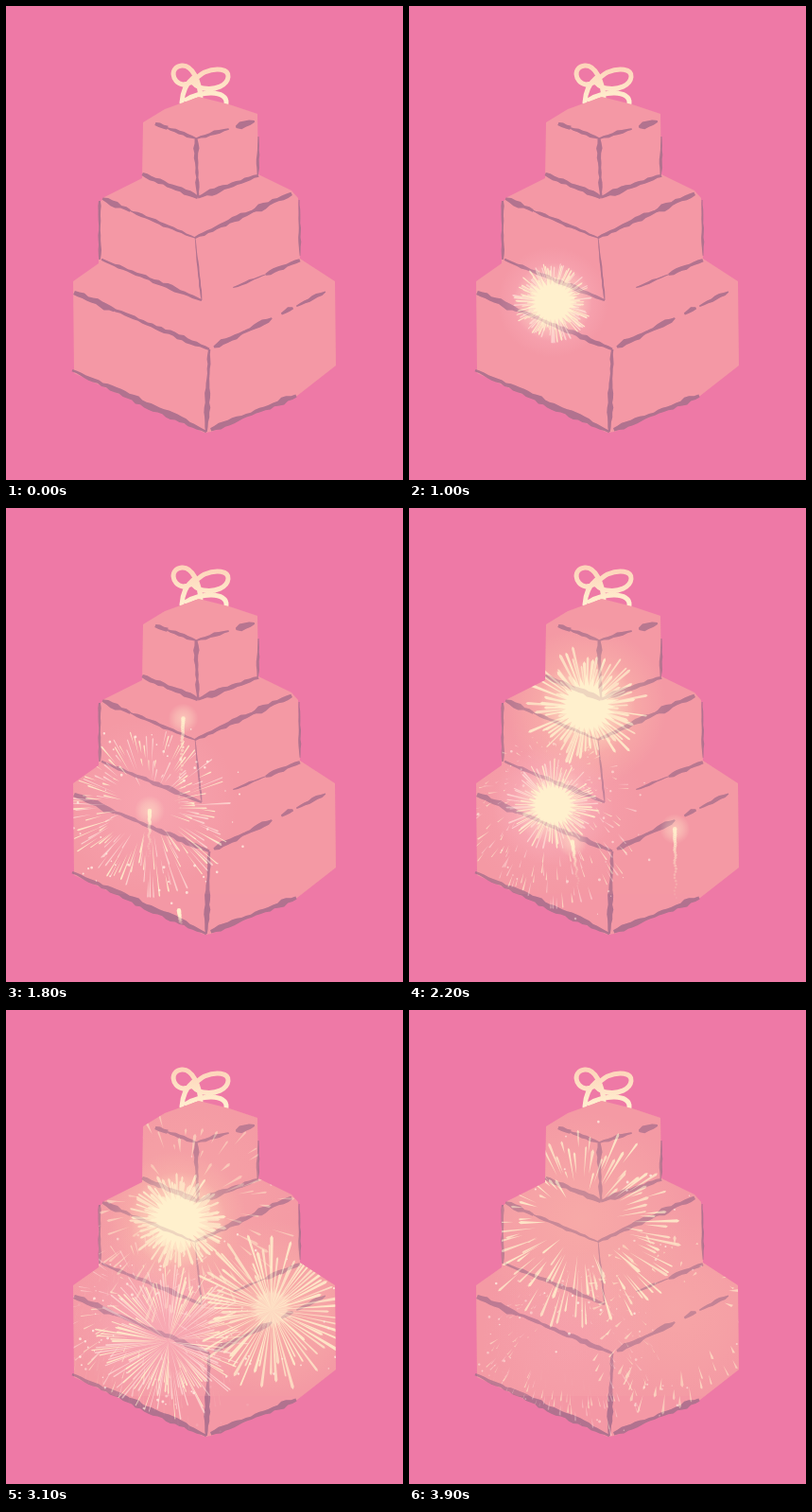
Recreate the animation shown at these times as an HTML page with a canvas. Size 420x501 px, loop 4 s.

```html
<!DOCTYPE html>
<html lang="en">
<head>
<meta charset="utf-8">
<title>Firework cake</title>
<style>
html, body { margin: 0; width: 100%; height: 100%; overflow: hidden; background: #ee79a6; }
canvas { display: block; }
</style>
</head>
<body>
<canvas id="stage" width="420" height="501"></canvas>
<script>
const ctx = document.getElementById('stage').getContext('2d');
const LOOP = 4000, STEP = 100, TAU = Math.PI * 2;
const PINK = '#ee79a6', CREAM = '#fff0cd', BLUSH = '#ffdfd9', MAUVE = '#b1728f';

function seeded(s) {
  return () => {
    s = (s * 16807) % 2147483647;
    return s / 2147483647;
  };
}
const clamp = v => Math.max(0, Math.min(1, v));
const rnd = seeded(4721);

const cake = new Path2D(
  'M145 123L168 109L204 96L236 104L266 114L267 178L302 195L309 203L311 267L348 291L349 380' +
  'L308 412L217 450L210 451L128 414L72 388L71 291L98 272L98 209L104 202L144 182Z');

const ribbon = new Path2D(
  'M206 98C205 79 197 62 186 63C173 64 175 81 187 83C197 83 202 74 210 70' +
  'C222 65 236 66 235 75C234 84 222 89 209 87Q200 86 196 78' +
  'M186 102Q187 85 198 76M191 99C204 90 235 88 233 103');

// Ragged brush mark from one point to another
const ink = new Path2D();
function brush([x0, y0], [x1, y1], w, from = 0, to = 1) {
  const dx = x1 - x0, dy = y1 - y0, len = Math.hypot(dx, dy);
  const n = Math.max(3, Math.round(len * (to - from) / 5));
  const near = [], far = [], phase = rnd() * TAU;
  for (let i = 0; i <= n; i++) {
    const v = i / n, u = from + (to - from) * v;
    const half = w * Math.min(1, 0.5 + 3 * Math.min(v, 1 - v)) * (0.5 + 0.12 * Math.sin(phase + v * 7));
    const a = half * (0.6 + rnd() * 0.8), b = half * (0.6 + rnd() * 0.8);
    const x = x0 + dx * u, y = y0 + dy * u;
    near.push([x - dy / len * a, y + dx / len * a]);
    far.unshift([x + dy / len * b, y - dx / len * b]);
  }
  near.concat(far).forEach(([x, y], i) => i ? ink.lineTo(x, y) : ink.moveTo(x, y));
  ink.closePath();
}

// Each tier: left, front and right corners of its top and of its base
const [top1, top2, top3] = [
  { t: [[158, 124], [201, 140], [263, 122]], b: [[144, 178], [203, 202], [267, 179]] },
  { t: [[102, 204], [200, 245], [302, 198]], b: [[101, 268], [207, 311], [311, 269]] },
  { t: [[72, 303], [215, 363], [338, 302]], b: [[70, 385], [212, 450], [307, 412]] }
];
function edges({ t, b }, wt, wb, wv) {
  brush(t[0], t[1], wt, 0, 0.3);
  brush(t[0], t[1], wt * 0.65, 0.28);
  brush(b[0], b[1], wb);
  brush(t[1], b[1], wv);
}
edges(top1, 5.5, 5.5, 4);
edges(top2, 5, 4, 1.8);
edges(top3, 6.5, 5.5, 4.5);
brush(top1.t[1], top1.t[2], 3.5, 0, 0.56);
brush(top1.t[1], top1.t[2], 6, 0.68);
brush(top1.b[1], top1.b[2], 4.8);
brush([267, 138], [266, 181], 2.5);
brush(top2.t[1], top2.t[2], 4.5, 0, 0.62);
brush(top2.t[1], top2.t[2], 6, 0.58);
brush(top2.b[1], top2.b[2], 2, 0.32, 0.66);
brush(top2.b[1], top2.b[2], 4.5, 0.65);
brush([99, 206], [99, 268], 3);
brush([310, 205], [311, 264], 2);
brush(top3.t[1], top3.t[2], 6, 0.04, 0.3);
brush(top3.t[1], top3.t[2], 4, 0.28, 0.54);
brush(top3.t[1], top3.t[2], 4.5, 0.62, 0.72);
brush(top3.t[1], top3.t[2], 3.5, 0.75);
brush(top3.b[1], top3.b[2], 5.5, 0.05);

// at: moment of bursting, R: reach, from: where its rocket starts
const soft = { R: 92, n: 150, core: 22, w: 1.7, dots: 70, tint: BLUSH, life: 2500 };
const bold = { R: 114, n: 76, core: 27, w: 3, dots: 25, tint: CREAM, life: 2500 };
const bursts = [
  { ...soft, at: 800, x: 152, y: 313, from: [155, 425] },
  { ...soft, at: 1950, x: 152, y: 314, n: 90, dots: 20, life: 2000, from: [151, 410] },
  { ...bold, at: 1950, x: 188, y: 210, R: 122, life: 1800, from: [180, 410] },
  { ...soft, at: 2350, x: 172, y: 347, core: 0, from: [185, 440] },
  { ...bold, at: 2500, x: 281, y: 315, R: 100, from: [282, 412] },
  { ...bold, at: 2900, x: 182, y: 222, n: 105, dots: 40, from: [184, 410] }
];
const RISE = 600;
const many = (n, make) => Array.from({ length: n }, (_, i) => make(i));
for (const b of bursts) {
  b.rays = many(b.n, i => ({
    a: (i + rnd() * 0.9) / b.n * TAU,
    s: 0.42 + 0.6 * Math.pow(rnd(), 0.65),
    lag: 450 + rnd() * 350,
    w: b.w * (0.55 + rnd() * 0.6),
    pale: rnd() < 0.5
  }));
  b.sparks = many(b.dots, () => ({ a: rnd() * TAU, s: 0.6 + rnd() * 0.6, w: 0.6 + rnd() * 0.9, blink: rnd() * 9 }));
}

const spread = age => age <= 0 ? 0 : 1 - Math.exp(-age / 335);

function glow(x, y, r, rgb, alpha) {
  const g = ctx.createRadialGradient(x, y, 0, x, y, r);
  g.addColorStop(0, `rgba(${rgb},${alpha})`);
  g.addColorStop(0.55, `rgba(${rgb},${alpha * 0.55})`);
  g.addColorStop(1, `rgba(${rgb},0)`);
  ctx.fillStyle = g;
  ctx.fillRect(x - r, y - r, r * 2, Math.max(0, Math.min(r * 2, 408 - y + r)));
}

function disc(x, y, r) {
  ctx.moveTo(x + r, y);
  ctx.arc(x, y, r, 0, TAU);
}

function rocket(b, t) {
  const u = (t - b.at + RISE) / RISE;
  if (u <= 0 || u >= 1) return;
  const pos = v => {
    const e = 1 - (1 - v) * (1 - v);
    return [b.from[0] + (b.x - b.from[0]) * e, b.from[1] + (b.y - b.from[1]) * e];
  };
  const [hx, hy] = pos(u);
  glow(hx, hy, 16, '255,226,200', 0.6);
  ctx.fillStyle = CREAM;
  const tail = Math.max(0, u - 0.5);
  for (let i = 0; i <= 26; i++) {
    const [x, y] = pos(u - (u - tail) * i / 26);
    ctx.globalAlpha = 0.85 * (1 - i / 29);
    ctx.beginPath();
    disc(x + Math.sin(i * 1.3 + b.x) * i * 0.05, y, 2.2 - i * 0.045);
    ctx.fill();
  }
  ctx.globalAlpha = 1;
}

function drawRays(b, age, drop, pale) {
  ctx.beginPath();
  for (const ray of b.rays) {
    if (ray.pale !== pale) continue;
    const head = b.R * ray.s * spread(age);
    const tail = Math.min(head - 3, b.R * ray.s * spread(age - ray.lag));
    const c = Math.cos(ray.a), s = Math.sin(ray.a), w = ray.w / 2;
    const x = b.x + c * head, y = b.y + s * head + drop;
    ctx.moveTo(b.x + c * tail, b.y + s * tail + drop * 0.7);
    ctx.lineTo(x + s * w, y - c * w);
    ctx.lineTo(x + c * w * 1.6, y + s * w * 1.6);
    ctx.lineTo(x - s * w, y + c * w);
    ctx.closePath();
  }
  ctx.fill();
}

function drawCore(b, age, early) {
  const r = b.core * clamp(0.4 + age / 250) * (0.55 + 0.45 * early);
  ctx.globalAlpha = Math.min(1, early * 1.4);
  glow(b.x, b.y, r * 1.9, '255,232,200', 0.8);
  ctx.fillStyle = CREAM;
  ctx.beginPath();
  for (let i = 0; i < 56; i++) {
    const a = i / 56 * TAU;
    const q = r * (i % 2 ? 0.82 : 0.95 + 0.35 * b.rays[i].s);
    ctx.lineTo(b.x + Math.cos(a) * q, b.y + Math.sin(a) * q);
  }
  ctx.closePath();
  ctx.fill();
}

function burst(b, t) {
  const age = t - b.at;
  if (age < 0 || age > b.life) return;
  const fade = clamp((b.life - age) / (b.life * 0.6));
  const early = clamp(1 - (age - 300) / 450);
  const drop = 9 * (age / 1000) ** 2;
  glow(b.x, b.y, b.R * (0.3 + 0.75 * spread(age)), b.tint === CREAM ? '255,205,175' : '255,190,200', 0.3 * fade + 0.3 * early);

  ctx.fillStyle = b.tint;
  ctx.globalAlpha = fade * 0.72;
  drawRays(b, age, drop, true);
  ctx.fillStyle = CREAM;
  ctx.globalAlpha = fade * 0.85;
  drawRays(b, age, drop, false);

  if (age > 350) {
    ctx.fillStyle = '#ffe9df';
    ctx.beginPath();
    for (const d of b.sparks) {
      if (Math.sin(age / 130 + d.blink) < -0.6) continue;
      const r = b.R * d.s * spread(age);
      disc(b.x + Math.cos(d.a) * r, b.y + Math.sin(d.a) * r + drop * 1.5, d.w);
    }
    ctx.fill();
  }
  if (b.core && early > 0) drawCore(b, age, early);
  ctx.globalAlpha = 1;
}

const silk = ctx.createLinearGradient(0, 62, 0, 102);
silk.addColorStop(0, '#fdd3b9');
silk.addColorStop(1, '#fff0d0');

function draw(t) {
  ctx.globalAlpha = 1;
  ctx.fillStyle = PINK;
  ctx.fillRect(0, 0, 420, 501);

  ctx.strokeStyle = silk;
  ctx.lineWidth = 5;
  ctx.lineCap = ctx.lineJoin = 'round';
  ctx.stroke(ribbon);

  ctx.fillStyle = '#f498a5';
  ctx.fill(cake);
  ctx.fillStyle = MAUVE;
  ctx.fill(ink);

  ctx.save();
  ctx.clip(cake);
  ctx.globalAlpha = 0.2 * clamp((t - 900) / 1800);
  ctx.fillStyle = '#f2a09f';
  ctx.fillRect(70, 96, 281, 312);
  ctx.globalAlpha = 1;
  for (const b of bursts) {
    rocket(b, t);
    burst(b, t);
  }
  ctx.globalAlpha = 0.22 * clamp((t - 700) / 200);
  ctx.fillStyle = MAUVE;
  ctx.fill(ink);
  ctx.restore();
}

function tick() {
  const t = performance.now() % LOOP;
  draw(Math.floor(t / STEP) * STEP);
  requestAnimationFrame(tick);
}
tick();
</script>
</body>
</html>
```
